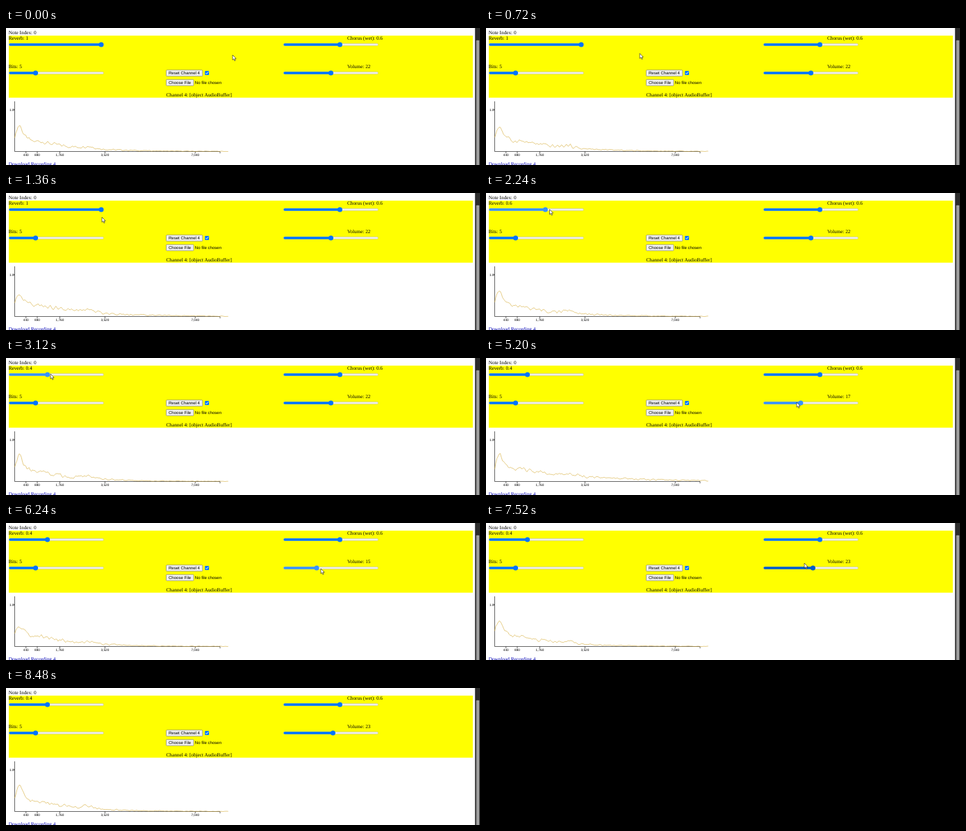
An HTML page that plays this animation: 682x198 px, repeating every 8560 ms.

```html
<!DOCTYPE html>
<html lang="en">
<head>
<meta charset="utf-8">
<title>Audio channel controls</title>
<style>
  html, body { margin: 0; width: 100%; height: 100%; overflow: hidden; background: #fff; }
  svg { display: block; width: 100vw; height: 100vh; }
  text { font: 7.26px "Liberation Serif", "Times New Roman", serif; white-space: pre; text-rendering: geometricPrecision; }
  .ui { font: 6.04px "Liberation Sans", Arial, sans-serif; }
  .tick { font: 4.7px "Liberation Sans", Arial, sans-serif; }
</style>
</head>
<body>
<svg id="stage" viewBox="0 0 682 198"></svg>
<script>
const LOOP = 8560, STEP = 80;
const LEFT = 12.5, BASE = 178.5, RIGHT = 321;
const stage = document.getElementById('stage');

const set = (el, attrs) => { for (const key in attrs) el.setAttribute(key, attrs[key]); };
function add(tag, attrs, content) {
  const el = document.createElementNS('http://www.w3.org/2000/svg', tag);
  set(el, attrs);
  if (content !== undefined) el.textContent = content;
  return stage.appendChild(el);
}
const rect = (x, y, width, height, fill, more) => add('rect', { x, y, width, height, fill, ...more });
const label = (x, y, content, more) => add('text', { x, y, ...more }, content);
const line = d => add('path', { d, fill: 'none', stroke: '#000', 'stroke-width': 0.6 });

function button(x, y, width, caption) {
  rect(x, y, width, 9, '#efefef', { rx: 1.2, stroke: '#666', 'stroke-width': 0.5 });
  label(x + 3.5, y + 6.7, caption, { class: 'ui' });
}

const COLORS = { idle: '#0075ff', hover: '#005cc8', active: '#3793ff' };

function slider(x, y, fraction) {
  rect(x, y - 1.6, 136, 3.2, '#efefef', { rx: 1.6, stroke: '#b2b2b2', 'stroke-width': 0.4 });
  const fill = rect(x, y - 1.7, 0, 3.4, COLORS.idle, { rx: 1.7 });
  const thumb = add('circle', { cy: y, r: 3.5 });
  const update = (value, state = 'idle') => {
    const cx = x + 3.6 + value * 129;
    set(fill, { width: cx - x, fill: COLORS[state] });
    set(thumb, { cx, fill: COLORS[state] });
  };
  update(fraction);
  return update;
}

// Page
label(3.7, 8.6, 'Note Index: 0');
rect(4, 11, 667.7, 89.7, '#ff0');
const reverbLabel = label(3.7, 17.2, '');
label(491, 17.2, 'Chorus (wet): 0.6');
label(3.7, 57.8, 'Bits: 5');
const volumeLabel = label(491, 57.6, '');
label(230.5, 98.8, 'Channel 4: [object AudioBuffer]');
const setReverb = slider(4.4, 24, 1);
slider(399.4, 24, 0.6);
slider(4.4, 65, 0.268);
const setVolume = slider(399.4, 65, 0.5);
button(230.5, 60.7, 52.3, 'Reset Channel 4');
button(230.5, 74.4, 39.5, 'Choose File');
label(271.8, 81.1, 'No file chosen', { class: 'ui' });
rect(286.2, 62, 5.9, 5.9, COLORS.idle, { rx: 1 });
add('path', { d: 'M287.4 65l1.3 1.4 2.3-3', fill: 'none', stroke: '#fff', 'stroke-width': 0.9 });
label(3.7, 198.7, 'Download Recording 4', { fill: '#0000b4' });
rect(674.8, 0, 7.2, 198, '#2c2c2c');
rect(676.6, 17.8, 4.4, 181, '#9f9f9f', { rx: 0.8 });

// Chart
line(`M${LEFT} 106V${BASE}H308v2.7M10 118h2.5`);
label(11.5, 119.7, '1.0', { class: 'tick', 'text-anchor': 'end' });
for (const hz of [440, 880, 1760, 3520, 7040]) {
  const x = LEFT + hz * 0.0369;
  line(`M${x} ${BASE}v2.7`);
  label(x, 184.8, hz.toLocaleString('en-US'), { class: 'tick', 'text-anchor': 'middle' });
}
const spectrum = add('path', { fill: 'none', stroke: '#d6ac38', 'stroke-width': 0.6, 'stroke-linejoin': 'round' });
const cursor = add('path', {
  d: 'M0 0v7.2l1.7-1.5 1.2 2.7 1.2-.5-1.2-2.6h2.3z',
  fill: '#fff', stroke: '#000', 'stroke-width': 0.55
});

// Eased 0..1 progress between two times
function glide(time, from, to) {
  const u = Math.min(1, Math.max(0, (time - from) / (to - from)));
  return u * u * (3 - 2 * u);
}
const bump = (v, center, width) => Math.exp(-(((v - center) / width) ** 2));
function random(a, b) {
  const s = Math.sin(a * 12.9898 + b * 78.233) * 43758.5453;
  return s - Math.floor(s);
}

const pointerStart = { x: 326, y: 39 };
const pointerMoves = [
  { from: 160, to: 1200, x: 138, y: 35 },
  { from: 1440, to: 1680, x: 137, y: 25 },
  { from: 1680, to: 2640, x: 64, y: 23 },
  { from: 3600, to: 4480, x: 467, y: 64 },
  { from: 4640, to: 5120, x: 447, y: 64 },
  { from: 5360, to: 5760, x: 453, y: 66 },
  { from: 6480, to: 7040, x: 472, y: 66 },
  { from: 7120, to: 7440, x: 458, y: 58 },
  { from: 7600, to: 8000, x: 466, y: 206 }
];

function pointerAt(time) {
  let { x, y } = pointerStart;
  for (const move of pointerMoves) {
    const u = glide(time, move.from, move.to);
    x += (move.x - x) * u;
    y += (move.y - y) * u;
  }
  return { x, y };
}

// Decaying spectrum with a low-frequency peak; two softer, fuller moments
function drawSpectrum(time) {
  const tick = time / STEP;
  const decay = 60 + 15 * bump(time, 1360, 700) + 38 * bump(time, 5200, 600);
  const peak = 14 - 10 * (bump(time, 1360, 500) + bump(time, 6240, 450));
  let d = '';
  for (let i = 0, u = 0; LEFT + u <= RIGHT; i++, u = i * 1.6) {
    const level = 27 * Math.exp(-u / decay) - 9 * Math.exp(-u / 2)
      + peak * bump(u, 7, 5) - 3 * bump(u, 26, 6) + 3 * bump(u, 106, 12);
    const noise = random(i, tick) + random(i + 1, tick) - 1;
    const y = BASE - Math.max(0, level + noise * Math.min(3, 0.5 + level * 0.3));
    d += `${i ? 'L' : 'M'}${(LEFT + u).toFixed(1)} ${y.toFixed(2)}`;
  }
  set(spectrum, { d });
}

function stateAt(time, grab, release, leave) {
  if (time >= grab && time < release) return 'active';
  return time >= grab - 2 * STEP && time < leave ? 'hover' : 'idle';
}

function draw(time) {
  const wet = Math.round(10 - 6 * glide(time, 1680, 2640)) / 10;
  const gain = Math.round(22 - 5 * glide(time, 4640, 5120)
    - 2 * glide(time, 5360, 5760) + 8 * glide(time, 6480, 7040));
  reverbLabel.textContent = `Reverb: ${wet}`;
  volumeLabel.textContent = `Volume: ${gain}`;
  setReverb(wet, stateAt(time, 1680, 3440, 3680));
  setVolume(gain / 44, stateAt(time, 4560, 7120, 7600));
  const { x, y } = pointerAt(time);
  set(cursor, { transform: `translate(${x} ${y})` });
  drawSpectrum(time);
}

const start = performance.now();
let last = -1;
function frame() {
  const elapsed = (performance.now() - start) % LOOP;
  const time = Math.floor(elapsed / STEP) * STEP;
  if (time !== last) draw(last = time);
  requestAnimationFrame(frame);
}
frame();
</script>
</body>
</html>
```
